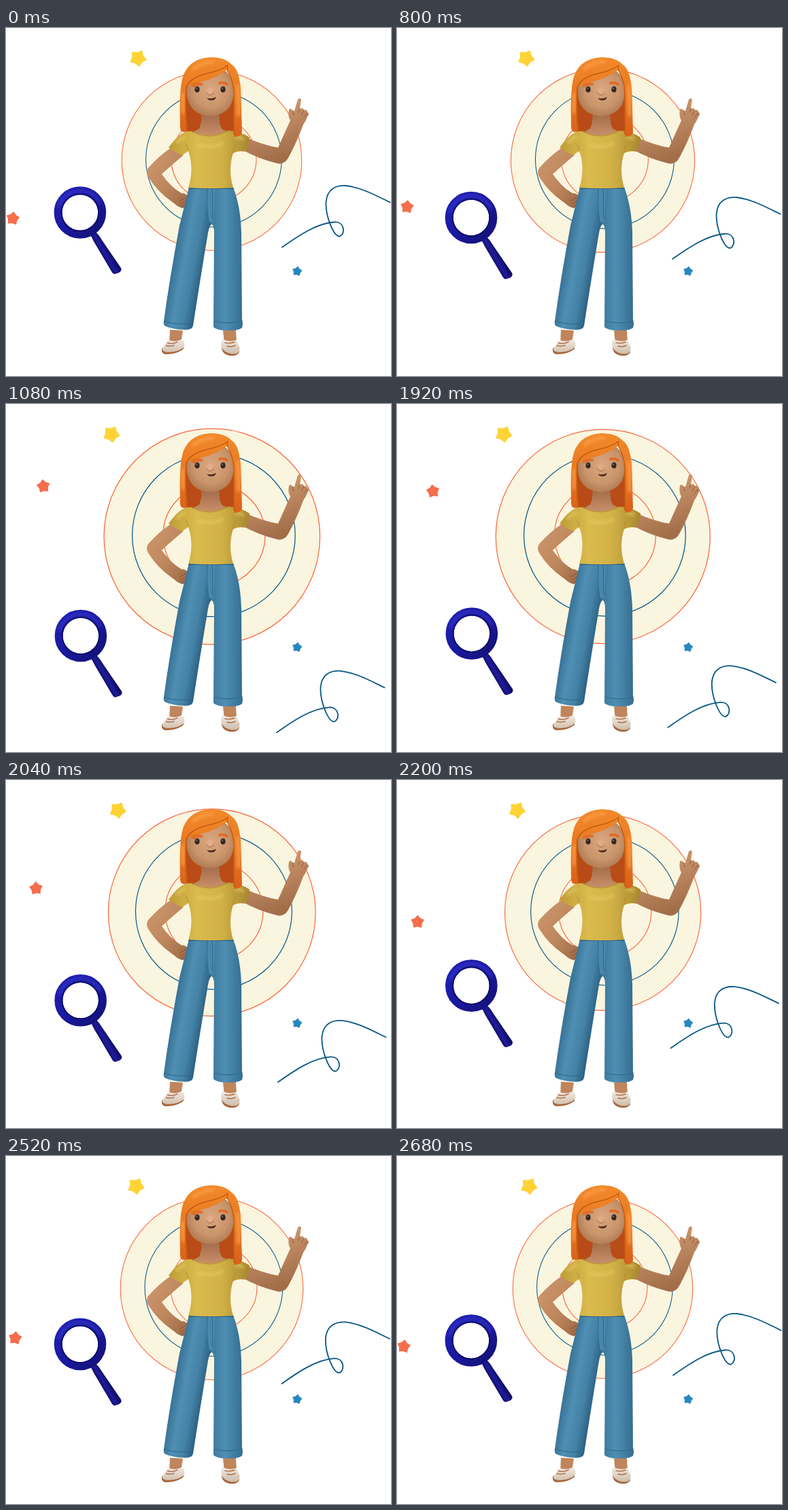
An HTML page for the animation above (2.78 s loop, 566x512 px).

```html
<!DOCTYPE html>
<html lang="en">
<head>
<meta charset="utf-8">
<title>Woman with magnifier</title>
<style>
html, body { margin: 0; width: 100%; height: 100%; overflow: hidden; background: #fff; }
svg { display: block; width: 566px; height: 512px; }
</style>
</head>
<body>
<svg viewBox="0 0 566 512" fill="none" stroke-linecap="round" stroke-linejoin="round">
<defs>
  <linearGradient id="skin" x2="1" y2="1"><stop stop-color="#cf986f"/><stop offset=".55" stop-color="#be875e"/><stop offset="1" stop-color="#9c6844"/></linearGradient>
  <linearGradient id="arm" x1="0" y1="0" x2=".35" y2="1"><stop offset=".3" stop-color="#c8936a"/><stop offset="1" stop-color="#a26e4a"/></linearGradient>
  <radialGradient id="face" cx=".53" cy=".45" r=".62"><stop stop-color="#daa780"/><stop offset=".6" stop-color="#ca956c"/><stop offset="1" stop-color="#a8734c"/></radialGradient>
  <linearGradient id="neck" x2="0" y2="1"><stop stop-color="#9a6341"/><stop offset="1" stop-color="#c9926a"/></linearGradient>
  <linearGradient id="hair" x2="0" y2="1"><stop stop-color="#f28a2a"/><stop offset=".5" stop-color="#e87620"/><stop offset="1" stop-color="#d9601a"/></linearGradient>
  <linearGradient id="shirt"><stop stop-color="#bf9c37"/><stop offset=".35" stop-color="#dabb4d"/><stop offset=".65" stop-color="#d1b146"/><stop offset="1" stop-color="#a8872f"/></linearGradient>
  <linearGradient id="legL" x1="248" x2="292" y1="330" y2="338" gradientUnits="userSpaceOnUse"><stop stop-color="#387295"/><stop offset=".35" stop-color="#4f8fb3"/><stop offset=".7" stop-color="#4482a6"/><stop offset="1" stop-color="#2d6283"/></linearGradient>
  <linearGradient id="legR"><stop stop-color="#3a7699"/><stop offset=".45" stop-color="#4f8fb3"/><stop offset="1" stop-color="#346d8f"/></linearGradient>
  <linearGradient id="shoe" x2="0" y2="1"><stop stop-color="#f1eae0"/><stop offset="1" stop-color="#cdbdab"/></linearGradient>
  <linearGradient id="ring" x2="1" y2="1"><stop stop-color="#2020b6"/><stop offset=".55" stop-color="#19189c"/><stop offset="1" stop-color="#131175"/></linearGradient>
  <linearGradient id="grip" x1="139" y1="334" x2="151" y2="327" gradientUnits="userSpaceOnUse"><stop stop-color="#0f0d60"/><stop offset=".5" stop-color="#1f1c9c"/><stop offset="1" stop-color="#100e66"/></linearGradient>
  <filter id="soft" x="-30%" y="-30%" width="160%" height="160%"><feGaussianBlur stdDeviation="2"/></filter>
</defs>

<g id="rings">
  <circle id="disc" cy="195" fill="#faf5df" stroke="#f8683f"/>
  <circle id="mid" cy="193.2" stroke="#0b5b87"/>
  <circle id="core" cy="193" stroke="#f8683f"/>
</g>

<path id="swirl" stroke="#075784" stroke-width="1.8" d="M406 322.500C430 305.500 457 287 483 285.500C498 284.500 499 303 491 306.500C482 308 469.500 277 470.500 256C472 237 485 231 500 232C522 234.500 543 246 564.500 256.500"/>
<path id="yellow" fill="#ffd335"/>
<path id="red" fill="#f56e4b"/>
<path id="blue" fill="#2589c0"/>

<g id="lens">
  <path fill="url(#grip)" d="M124 304L132 300Q137 305 141 312L169 353Q171 357 166 360L160 362Q157 362 155 358L129 314Z"/>
  <circle cx="108.900" cy="271.500" r="32.300" stroke="url(#ring)" stroke-width="12"/>
  <circle cx="108.900" cy="271.500" r="27.300" stroke="#0e0d68" stroke-width="2"/>
  <path stroke="#3a3bd0" stroke-width="2.500" filter="url(#soft)" d="M78 263A32 32 0 0 1 138 258"/>
</g>

<g id="woman">
  <!-- hair behind, neck -->
  <path fill="#b94c16" d="M262 85H338V154Q318 160 314 153H288Q278 157 262 152Z"/>
  <path fill="url(#neck)" d="M287 119H314Q312 139 317 148L328 154Q302 166 273 154L284 148Q289 139 287 119Z"/>

  <!-- arms -->
  <path fill="url(#skin)" d="M243 176Q226 187 209 206Q205 212 209 219Q223 242 246 257Q253 264 260 265Q265 263 265 256L267 247Q264 243 258 243Q242 234 229 215Q242 203 261 187Z"/>
  <path stroke="#835436" d="M256 254L264 249M257 259L264 255M258 263L264 260"/>
  <path fill="url(#arm)" d="M353 161Q377 172 400 176Q408 158 418 136Q414 130 416 120Q418 117 421 121L424 122L429 105Q431 102 434 105L432 119Q437 116 438 121Q443 119 443 124Q447 125 443 131Q440 138 437 142Q427 169 415 191Q409 202 398 199Q370 192 347 179Z"/>
  <path stroke="#8e5c3d" d="M432 119L430 124M438 121L434 128M443 125L438 131M421 122L423 128"/>

  <!-- trousers -->
  <path fill="url(#legL)" d="M269 234H303V288Q299 290 297 301Q286 367 275 438Q274 444 263 444Q247 444 235 439Q231 438 232 431Q241 366 255 291Q262 263 269 234Z"/>
  <path fill="url(#legR)" d="M300 234H334Q345 263 346 301L347 431Q349 434 347 441Q341 446 325 445Q310 445 305 440L306 301Q306 289 301 288Z"/>
  <path fill="#4988ac" d="M292 235H308L304 287H299Z"/>
  <path stroke="#2f698b" d="M295.500 237V281Q298 286 302 286M303.500 237V280M233 431Q250 438 275 434M306 431Q325 437 348 431"/>
  <path stroke="#2a5c7c" stroke-width="1.500" d="M269 236H334"/>

  <!-- shirt -->
  <path fill="url(#shirt)" d="M273 152Q299 165 326 151Q343 151 358 161Q358 172 351 182Q342 180 334 184Q326 208 334 235Q301 237 268 235Q277 207 268 181L259 187Q248 183 239 176Q250 160 261 154Q267 151 273 152Z"/>
  <path stroke="#e6cb66" stroke-width="5" opacity=".6" filter="url(#soft)" d="M252 168L262 160M284 172Q300 178 318 170M338 159L348 163"/>
  <path stroke="#b18d2c" d="M274 153Q299 166 326 152M268 181Q267 174 264 171M334 184Q334 176 337 172"/>

  <!-- feet -->
  <path fill="#c0855c" d="M241 444L260 445L257 465H240ZM319 445H338L339 465H321Z"/>
  <path fill="#a9683f" d="M229 471Q228 479 234 480Q252 480 261 472V467H236ZM317 469Q317 478 325 481Q338 485 343 477V469Z"/>
  <path fill="url(#shoe)" d="M239 459Q250 463 258 458Q264 461 262 469Q254 477 237 477Q228 476 230 470Q236 466 239 459ZM319 458Q329 463 339 459Q343 466 343 476Q337 482 326 478Q317 474 316 466Q316 460 319 458Z"/>
  <path stroke="#b1714a" stroke-width="1.600" d="M237 463Q243 466 252 462M235 467Q241 469 247 467M322 463Q329 465 336 462M325 468Q331 470 337 467"/>

  <!-- head -->
  <path fill="url(#face)" d="M265 84Q270 60 301 58Q331 59 334 84V100Q332 126 301 130Q271 128 266 101Z"/>
  <path fill="url(#hair)" d="M262 153Q255 153 256 143Q255 97 258 80Q264 45 301 43Q322 43 332 54Q342 60 345 88L347 153Q347 160 335 160L334 94Q333 75 326 61Q312 72 291 78Q272 82 265 88Q264 120 267 149Q266 153 262 153Z"/>
  <path stroke="#fb9f4a" stroke-width="4" filter="url(#soft)" d="M276 60Q287 50 304 50M341 85L342 128M260 97V124"/>
  <path stroke="#c2590f" stroke-width="1.400" d="M326 55Q315 63 295 67Q272 72 265 87M326 55Q324 60 327 65Q334 78 335 95V156M265 87Q263 118 266 149"/>
  <path stroke="#df6e28" stroke-width="4.200" d="M275 85Q280 81 287 82.500M314 81Q320 79 325 83"/>
  <g fill="#352820"><ellipse cx="281" cy="90.300" rx="3.600" ry="4.500"/><ellipse cx="319" cy="90.300" rx="3.600" ry="4.500"/></g>
  <g fill="#a89585"><circle cx="280" cy="88.500" r=".9"/><circle cx="318" cy="88.500" r=".9"/></g>
  <ellipse cx="300" cy="94.500" rx="5.500" ry="5" fill="#b97e56"/>
  <ellipse cx="300" cy="92.500" rx="5" ry="5.300" fill="#dfac86"/>
  <path fill="#512c20" d="M295.500 103Q302 105 308.500 101.500Q308 106.500 302 106.500Q297 106.500 295.500 103Z"/>
</g>
</svg>

<script>
const LOOP = 2780, STEP = 40;
const el = id => document.getElementById(id);
const mix = (a, b, p) => a + (b - a) * p;

// Cubic timing curve, solved by bisection
function ease(x, x1, y1, x2, y2) {
  const at = (s, a, b) => 3 * s * (1 - s) ** 2 * a + 3 * s * s * (1 - s) * b + s ** 3;
  let lo = 0, hi = 1;
  for (let i = 0; i < 24; i++) {
    const s = (lo + hi) / 2;
    if (at(s, x1, x2) < x) lo = s; else hi = s;
  }
  return at(lo, y1, y2);
}

// 0 = resting pose, 1 = spread pose
function spread(t) {
  const part = (start, steps) =>
    Math.max(0, Math.min(1, (Math.floor((t - start) / STEP) + 1) / steps));
  const out = part(800, 8), back = part(1920, 20);
  if (back >= 1 || out <= 0) return 0;
  if (back > 0) return 1 - ease(back, .3, .25, .4, .84);
  return out - .025 * Math.sin(2 * Math.PI * out);
}

function star(id, x, y, r, turn) {
  const points = Array.from({ length: 10 }, (_, i) => {
    const a = (turn - 90 + i * 36) * Math.PI / 180, d = i % 2 ? r * .68 : r;
    return (x + d * Math.cos(a)).toFixed(2) + " " + (y + d * Math.sin(a)).toFixed(2);
  });
  el(id).setAttribute("d", "M" + points.join("L") + "Z");
}

function circle(id, x, r) {
  el(id).setAttribute("cx", x);
  el(id).setAttribute("r", r);
}

const shift = (id, x, y) => el(id).setAttribute("transform", `translate(${x} ${y})`);

function draw(t) {
  const p = spread(t), scale = mix(1, 1.2, p);
  circle("disc", mix(302.5, 302.8, p), 132.3 * scale);
  circle("mid", 305.4, 99.8 * scale);
  circle("core", mix(305.5, 306, p), 62.5 * scale);
  el("rings").setAttribute("stroke-width", 1.05 * scale);
  shift("swirl", -8 * p, 160.8 * p);
  shift("lens", p, 69.5 * p);
  star("yellow", mix(194, 155, p), 44.5, 13, 28);
  star("red", mix(10, 55, p), mix(280.3, 121, p), 10.3, mix(8, -8, p));
}

star("blue", 428, 358, 7.6, 8);
function tick(now) {
  draw(now % LOOP);
  requestAnimationFrame(tick);
}
draw(0);
requestAnimationFrame(tick);
</script>
</body>
</html>
```
